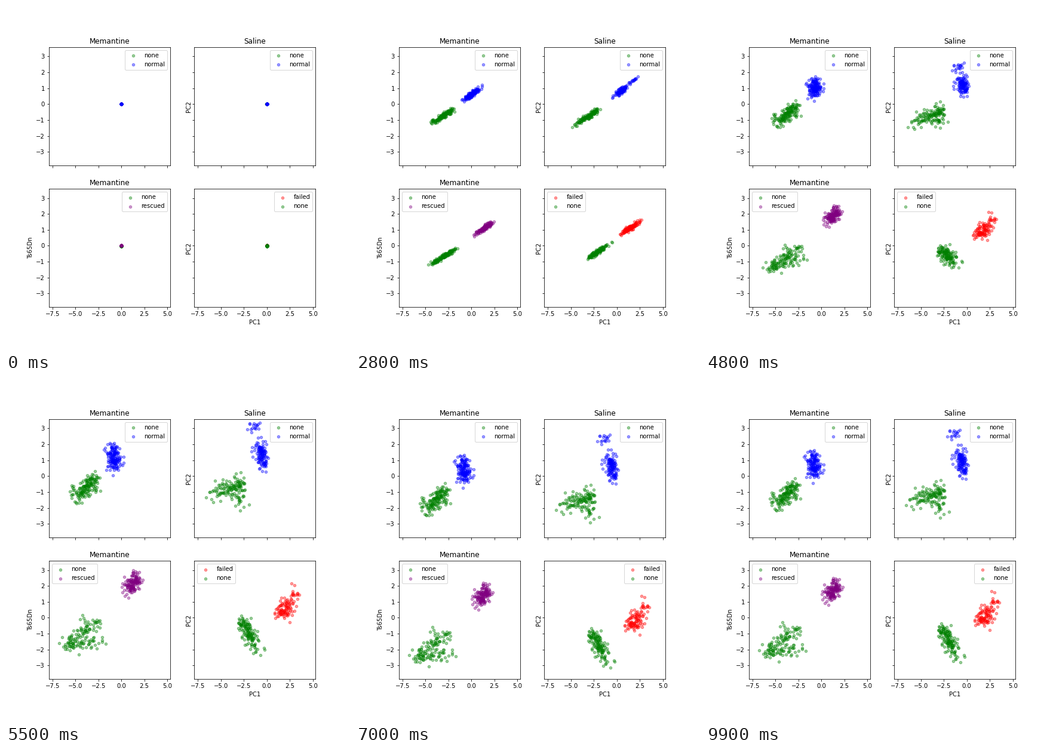
A matplotlib script for the animation above (10 s loop, 576 by 576 pixels).

```python
import numpy as np
import matplotlib.pyplot as plt
from matplotlib.animation import FuncAnimation

FRAMES, INTERVAL = 100, 100
LINE, BAND, OPEN = 15, 39, 55      # steps at which each pose is reached
LINE_SLOPE, BAND_SLOPE = 0.418, 0.33
rng = np.random.default_rng(7)


def ease(k, start, end):
    u = np.clip((k - start) / (end - start), 0, 1)
    return u * u * (3 - 2 * u)


def swing(k):
    """Vertical offset of the open clouds, a damped oscillation."""
    t = k - OPEN
    return 0.5 * np.exp(-t / 29) * np.cos(2 * np.pi * t / 10.5)


class Cloud:
    """Points that go from the origin to a line, a band and an open cloud."""

    def __init__(self, ax, label, color, n, line, band, spine):
        t = rng.beta(1.6, 1.6, n) * (len(spine) - 1)
        sx, sy = np.transpose(spine)
        jitter = np.clip(rng.standard_t(6, (2, n)), -2.8, 2.8)
        x = np.interp(t, range(len(spine)), sx) + 0.32 * jitter[0]
        y = np.interp(t, range(len(spine)), sy) + 0.24 * jitter[1]
        self.open = np.column_stack([x, y])

        lo, hi = line
        x1 = lo + (hi - lo) * (x - x.min()) / np.ptp(x)
        self.line = np.column_stack([x1, LINE_SLOPE * x1])

        dx = 0.85 * (x - x.mean())
        dy = BAND_SLOPE * dx + 0.13 * jitter[1]
        self.band = np.column_stack([dx, dy]) + band

        self.dots = ax.scatter(x, y, s=20, color=color, alpha=0.4, label=label)

    def at(self, k):
        if k <= LINE:
            return self.line * (0.005 + 0.995 * np.exp(0.75 * (k - LINE)))
        if k <= BAND:
            return self.line + ease(k, LINE, BAND) * (self.band - self.line)
        target = self.open + [0, swing(max(k, OPEN))]
        return self.band + ease(k, BAND, OPEN) * (target - self.band)


fig, axes = plt.subplots(2, 2, figsize=(8, 8), dpi=72, sharex=True, sharey=True)
fig.subplots_adjust(left=0.125, right=0.9, bottom=0.125, top=0.88,
                    wspace=0.2, hspace=0.2)
(mem, sal), (ts_mem, ts_sal) = axes

# axes, label, colour, count, line ends, band centre, spine of the open cloud
clouds = [
    Cloud(mem, "none", "green", 150, (-3.6, -1.3), (-3.6, -0.5),
          [(-5.3, -1.9), (-3.8, -1.2), (-2.6, -0.6)]),
    Cloud(mem, "normal", "blue", 150, (-0.5, 2.3), (-0.6, 0.85),
          [(-0.6, 0.1), (-0.8, 0.6), (-1.1, 1.3)]),
    Cloud(sal, "none", "green", 135, (-3.2, -1.4), (-3.8, -0.6),
          [(-6.0, -1.5), (-4.4, -1.3), (-2.7, -0.9), (-2.9, -2.7)]),
    Cloud(sal, "normal", "blue", 118, (0.4, 2.1), (-0.3, 1.0),
          [(-0.4, 0.2), (-0.6, 0.7), (-0.8, 1.5)]),
    Cloud(sal, "_far", "blue", 17, (3.7, 4.85), (-0.3, 1.2),
          [(-1.8, 2.5), (-0.9, 2.7)]),
    Cloud(ts_mem, "none", "green", 135, (-3.3, -1.6), (-3.6, -0.4),
          [(-2.2, -0.8), (-3.6, -0.9), (-6.0, -2.2), (-4.0, -2.1), (-1.8, -1.9)]),
    Cloud(ts_mem, "rescued", "purple", 135, (0.2, 2.8), (1.3, 1.5),
          [(0.7, 1.2), (1.1, 1.7), (2.0, 2.1)]),
    Cloud(ts_sal, "failed", "red", 105, (0.3, 2.6), (1.5, 1.55),
          [(1.3, -0.3), (2.1, 0.1), (3.2, 1.1)]),
    Cloud(ts_sal, "none", "green", 135, (-2.9, 0), (-2.4, -0.1),
          [(-2.9, -0.7), (-2.3, -1.0), (-1.8, -1.7), (-0.8, -2.7)]),
]

mem.set(title="Memantine", xlim=(-7.875, 5.305), ylim=(-3.85, 3.57),
        xticks=np.arange(-7.5, 5.1, 2.5), yticks=range(-3, 4))
sal.set_title("Saline")
ts_mem.set_title("Memantine")
ts_mem.set_ylabel("Ts65Dn")
ts_sal.set_xlabel("PC1")
for ax in (sal, ts_sal):
    ax.set_ylabel("PC2", labelpad=0.5)
legends = [ax.legend(loc="upper right") for ax in axes.flat]


def update(k):
    for c in clouds:
        c.dots.set_offsets(c.at(k))
    # the lower legends make room for points in their corner
    for legend, end in zip(legends[2:], (FRAMES, 62)):
        legend.set_loc("upper left" if 28 <= k < end else "upper right")
    return [c.dots for c in clouds]


anim = FuncAnimation(fig, update, frames=FRAMES, interval=INTERVAL,
                     repeat=True, repeat_delay=0, blit=False)
plt.show()
```
